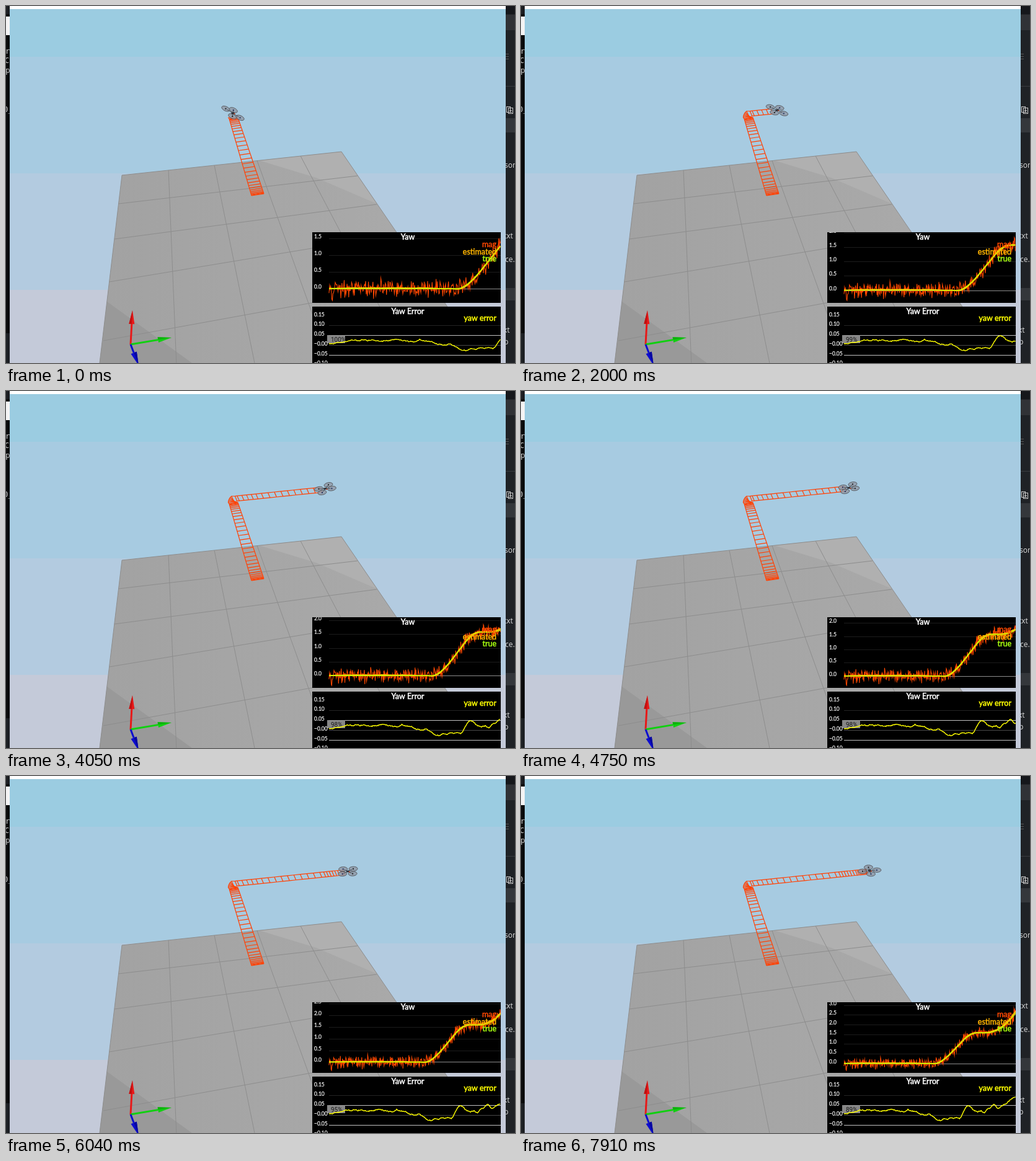
Write an HTML page with a canvas that moves like this. It is 821 px wide and 576 px high and loops after 8000 ms.

```html
<!DOCTYPE html>
<html>
<head>
<meta charset="utf-8">
<style>
html, body { margin: 0; width: 821px; height: 576px; overflow: hidden; background: #0c0c0c }
canvas { display: block }
</style>
</head>
<body>
<canvas id="stage" width="821" height="576"></canvas>
<script>
const g = document.getElementById('stage').getContext('2d');
const LOOP = 8, STEP = .13, PAUSE = [2, 2.49];

const mix = (a, b, u) => a + (b - a) * u;
const clamp = u => Math.min(1, Math.max(0, u));
const smooth = u => u * u * (3 - 2 * u);
const rand = n => { const v = Math.sin(n * 127.1 + 3.7) * 43758.5453; return v - Math.floor(v) };

// Interpolates [key, value] pairs.
function sample(pairs, k, ease = u => u) {
  let i = 1;
  while (i < pairs.length - 1 && pairs[i][0] < k) i++;
  const [k0, v0] = pairs[i - 1], [k1, v1] = pairs[i];
  return mix(v0, v1, ease(clamp((k - k0) / (k1 - k0))));
}

function tick(now) {
  if (now >= PAUSE[0] && now < PAUSE[1]) return PAUSE[0];
  const start = now < PAUSE[1] ? 0 : PAUSE[1];
  return start + Math.floor((now - start) / STEP) * STEP;
}

// Flight: times are in seconds, s is the position in the recorded data.
const dataLength = t => 1.325 + .0898 * t - .0024 * t * t;
const yaw = s => 1.57 * smooth(clamp((s - .98) / .48)) + 10 * Math.max(0, s - 1.56) ** 2;
const charge = t => Math.floor(sample([[0, 100], [5.5, 97.9], [6.7, 92.6], [8, 89]], t));
const tiltAt = t => sample([[0, .6], [2, .3], [4, -.27], [6.5, 0]], t);
function position(t) {
  const x = sample([[0, 366], [1, 377], [2, 413], [4.05, 515], [5.5, 546], [6.7, 559], [8, 563]], t);
  return [x, 173 - .103 * (x - 366)];
}
// Yaw error as a height on screen: a few turning points plus a smooth random wobble.
function errorY(s) {
  const turns = [[0, 546], [.08, 542], [.38, 539], [.72, 540], [.9, 546], [1.04, 554], [1.26, 552],
    [1.36, 531], [1.44, 542], [1.53, 542], [1.64, 531], [1.68, 537], [1.76, 528], [1.884, 518]];
  const n = Math.floor(s * 30);
  return sample(turns, s, smooth) + (mix(rand(n), rand(n + 1), s * 30 - n) - .5) * 4;
}

function trace(points) {
  g.beginPath();
  points.forEach(p => g.lineTo(...p));
}
function line(points, color, width = 1) {
  trace(points);
  g.strokeStyle = color;
  g.lineWidth = width;
  g.stroke();
}
function fill(points, color) {
  trace(points);
  g.closePath();
  g.fillStyle = color;
  g.fill();
}
function rect(x, y, w, h, color) {
  g.fillStyle = color;
  g.fillRect(x, y, w, h);
}
function text(str, x, y, color, font, align = 'left', weight = 0) {
  g.font = font;
  g.textAlign = align;
  g.fillStyle = g.strokeStyle = color;
  g.fillText(str, x, y);
  if (weight) {
    g.lineWidth = weight;
    g.strokeText(str, x, y);
  }
}

function desktop() {
  const mono = '12px "DejaVu Sans Mono", monospace', sans = '12px "Open Sans", sans-serif';
  rect(0, 0, 6, 576, '#0a0a0b');
  rect(0, 0, 6, 13, '#1c1e22');
  rect(0, 17, 6, 30, '#f4f4f4');
  rect(0, 528, 6, 48, '#1d2024');
  text('r', -1, 77, '#ccc', mono);
  text('C', -2, 92, '#ccc', mono);
  text('op', -8, 108, '#ccc', mono);
  text('0_', -4, 171, '#ccc', mono);
  rect(806, 0, 15, 576, '#1f2226');
  rect(806, 0, 15, 13, '#15171b');
  rect(806, 14, 15, 25, '#303236');
  rect(806, 129, 15, 1, '#3a3c40');
  rect(806, 181, 15, 23, '#34373b');
  rect(806, 455, 15, 20, '#34373b');
  for (let y = 77; y < 86; y += 4) rect(806, y, 5, 1, '#555');
  g.strokeStyle = '#ccc';
  g.lineWidth = 1;
  g.strokeRect(807.5, 162.5, 6, 9);
  g.strokeRect(810.5, 164.5, 7, 9);
  line([[812, 168.5], [816, 168.5]], '#ccc');
  line([[812, 171.5], [816, 171.5]], '#ccc');
  text('son', 804, 261, '#ddd', sans);
  text('txt', 803, 375, '#ddd', sans);
  text('ce.', 805, 413, '#ddd', sans);
  text('xt', 802, 527, '#ddd', sans);
  text('p', 803, 546, '#ddd', sans);
}

function scene() {
  ['#9bcce1', '#a7cbe1', '#b3cbe0', '#c4cad9'].forEach((color, i) => {
    const top = i && 82 + (i - 1) * 188;
    rect(6, top, 800, 576 - top, color);
  });
  rect(6, 0, 800, 5, '#fff');

  const ground = [[151, 576], [187, 273], [541, 235], [774, 576]];
  const shade = g.createLinearGradient(160, 0, 620, 0);
  shade.addColorStop(0, '#a2a2a2');
  shade.addColorStop(1, '#a9a9a9');
  fill(ground, shade);
  fill([[408, 249], [541, 235], [598, 319], [500, 277]], '#b0b0b0');
  fill([[163, 477], [300, 576], [151, 576]], '#999');
  const grid = '#8d8d8d';
  // Lines running toward the viewer share one vanishing point.
  for (const u of [.212, .421, .616, .814]) {
    const x = mix(187, 541, u), y = mix(273, 235, u);
    line([[x, y], [mix(243, x, 776 / (y + 200)), 576]], grid);
  }
  for (const [x1, y1, x2, y2] of [[182, 319, 567, 274], [175, 376, 598, 320], [167, 445, 632, 368], [157, 540, 680, 445]])
    line([[x1, y1], [x2, y2]], grid);
  line(ground, grid);
}

function arrow(tip, width, color, dark) {
  const from = [201, 546];
  const dx = tip[0] - from[0], dy = tip[1] - from[1], size = Math.hypot(dx, dy);
  const neck = [tip[0] - dx / size * 22, tip[1] - dy / size * 22];
  const side = k => [neck[0] - dy / size * k, neck[1] + dx / size * k];
  line([from, neck], color, 3);
  fill([side(-width), tip, side(width)], color);
  fill([side(-width), side(0), tip], dark);
}
function axes() {
  arrow([204, 491], 4.5, '#e81818', '#c01010');
  arrow([267, 535], 4.5, '#10d010', '#0cb00c');
  arrow([214, 580], 5, '#0c0cd0', '#0808a0');
}

function trail(t) {
  const rungs = [];
  for (let u = 0; u <= 1; u += 1 / 31) {
    const s = u - .8 * Math.sin(2 * Math.PI * u) / (2 * Math.PI);
    rungs.push([[mix(396, 360, s), mix(306, 182, s)], [mix(416, 374, s), mix(303, 180, s)]]);
  }
  // The rungs swing round at the corner, then follow the flight.
  for (let u = 0; u <= Math.min(1, t / .8); u += .2) {
    const y = mix(180, 174.5, u), dx = 7.5 * Math.cos(u * 1.25), dy = 5 * Math.sin(u * 1.25);
    rungs.push([[366 - dx, y - dy], [366 + dx, y + dy]]);
  }
  for (let k = .84; k <= t; k += .21) {
    const [x, y] = position(k);
    rungs.push([[x - 6, y - 2.5], [x - 2.5, y + 5.5]]);
  }
  const sides = [0, 1].map(i => rungs.map(r => r[i]));
  for (const path of [...rungs, ...sides]) line(path, '#ff4206', 1.2);
}

function drone(t) {
  const [x, y] = position(t), tilt = tiltAt(t), heading = yaw(dataLength(t)) - 1.2;
  const rotors = [0, 1, 2, 3].map(i => {
    const angle = heading + i * Math.PI / 2, dx = 11.6 * Math.cos(angle);
    return [dx, 5.5 * Math.sin(angle) + tilt * dx];
  }).sort((p, q) => p[1] - q[1]);
  for (const [dx, dy] of rotors) {
    g.beginPath();
    g.ellipse(x + dx, y + dy, 7, 3.6, tilt * .7, 0, 7);
    g.fillStyle = 'rgba(145,155,168,.85)';
    g.fill();
    g.strokeStyle = '#5a5d63';
    g.lineWidth = 1;
    g.stroke();
  }
  rotors.forEach(([dx, dy], i) => {
    line([[x, y], [x + dx * .8, y + dy * .8]], '#4c5058');
    rect(x + dx - 1, y + dy - 1, 2, 2, i % 2 ? '#26345e' : '#222');
  });
  rect(x - 2.5, y - 1.5, 5, 3, '#30333a');
  rect(x + 1.5, y, 2, 1.5, '#d04520');
}

const TITLE = '12.5px Lato, sans-serif', LABEL = '8.5px Lato, sans-serif';
const caption = (str, y, color) => text(str, 791, y, color, TITLE, 'right', .5);

function panel(y, h, title, draw) {
  g.save();
  g.beginPath();
  g.rect(494, y, 304, h);
  g.clip();
  rect(494, y, 304, h, '#000');
  draw();
  text(title, 648, y + 12, '#fff', TITLE, 'center', .5);
  g.restore();
}

function yawPlot(len) {
  // The vertical scale fits the latest value; unit is the height of half a radian.
  const unit = 50 / (yaw(len) + .59), zero = 474.6 - .69 * unit;
  const xOf = s => 521 + s / len * 277, yOf = v => zero - v * 2 * unit;
  for (let i = 0; i < 7; i++) {
    const y = Math.round(zero - i * unit);
    rect(521, y, 277, 1, i ? '#1c1c1c' : '#8c8c8c');
    text((i / 2).toFixed(1), 497, y, '#fff', LABEL, 'left', .2);
  }
  const mag = [], estimate = [], real = [];
  for (let i = 0; i <= len * 230; i++) {
    const s = i / 230, v = yaw(s), x = xOf(s);
    const noise = (rand(i) + rand(i + 900) + rand(i + 1800) - 1.5) * .26;
    mag.push([x, yOf(v + noise)]);
    estimate.push([x, yOf(v + (546 - errorY(s)) * .0032)]);
    real.push([x, yOf(v)]);
  }
  line(mag, '#ff4800', 1.1);
  line(estimate, '#ffc400', 2);
  line(real, '#c8ff00', 1.4);
  caption('mag', 389, '#ff4800');
  caption('estimated', 401, '#ffb400');
  caption('true', 412, '#a8ff10');
}

function errorPlot(len, percent) {
  for (let i = 0; i < 6; i++) {
    const y = Math.round(499.5 + i * 15.75), value = (3 - i) * .05;
    const color = i === 2 || i === 4 ? '#c0c0c0' : i === 3 ? '#484848' : '#242424';
    if (i) rect(521, y, 277, 1, color);
    text((i < 3 ? '' : '−') + Math.abs(value).toFixed(2), 497, y + 1, '#fff', LABEL, 'left', .2);
  }
  rect(518, 531, 29, 13, 'rgba(150,150,150,.9)');
  text(percent + '%', 524, 542, '#181818', '10px Roboto, sans-serif');
  const points = [];
  for (let i = 0; i <= len * 140; i++)
    points.push([521 + i / 140 / len * 277, errorY(i / 140) + (rand(i + 5000) - .5) * 1.4]);
  line(points, '#ff0', 1.4);
  caption('yaw error', 508, '#ff0');
}

function render() {
  const t = tick(performance.now() / 1000 % LOOP), len = dataLength(t);
  desktop();
  g.save();
  g.beginPath();
  g.rect(6, 0, 800, 576);
  g.clip();
  scene();
  axes();
  trail(t);
  drone(t);
  panel(365, 114, 'Yaw', () => yawPlot(len));
  panel(485, 91, 'Yaw Error', () => errorPlot(len, charge(t)));
  g.restore();
  requestAnimationFrame(render);
}
render();
</script>
</body>
</html>
```
